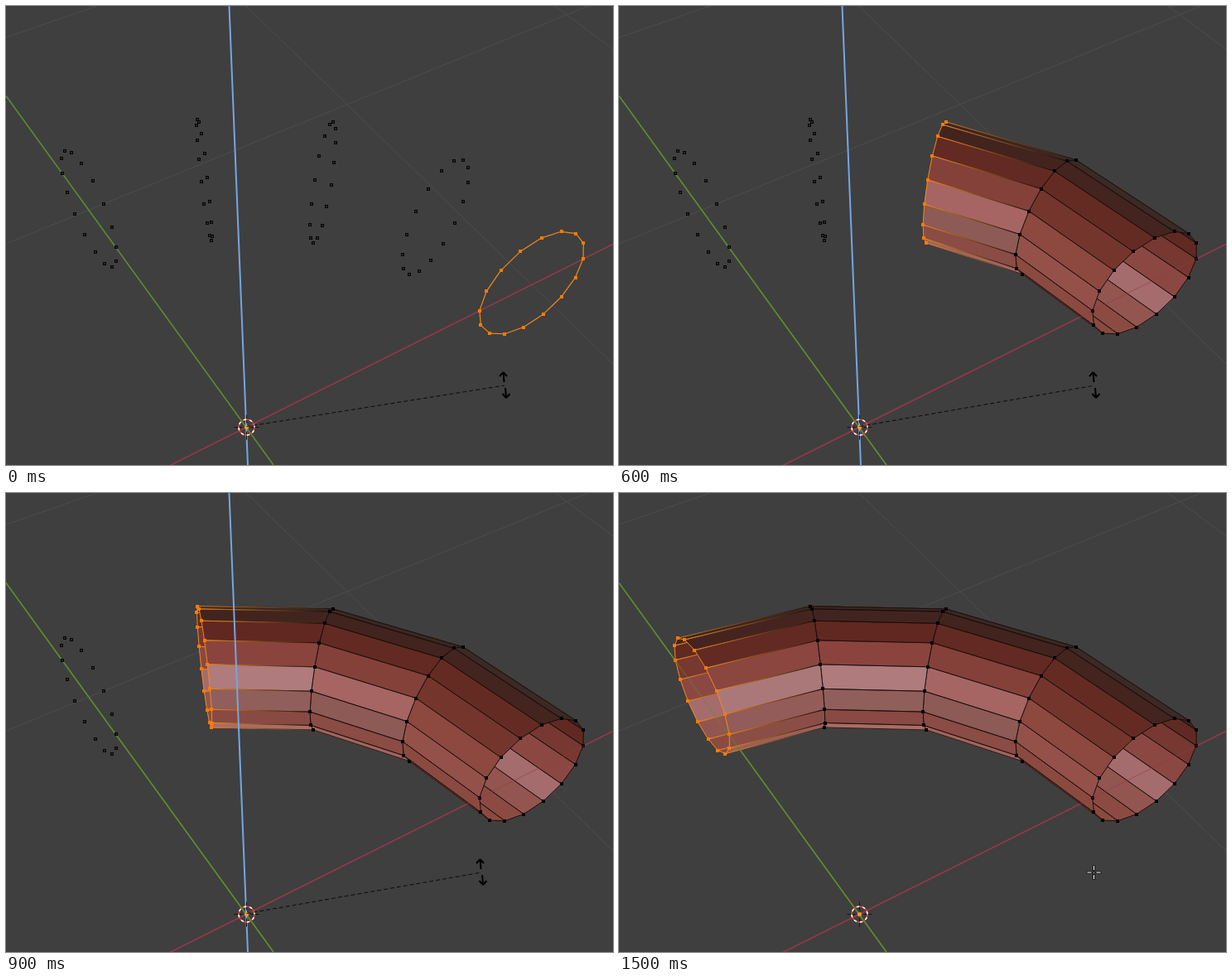
Animation, 733 px wide and 554 px high, one loop 1800 ms. Source, as an HTML page with a canvas:

```html
<!DOCTYPE html>
<html lang="en">
<head>
<meta charset="utf-8">
<title>Spin extrusion</title>
<style>
  html, body { margin: 0; width: 100%; height: 100%; overflow: hidden; background: #3f3f3f; }
  canvas { display: block; }
</style>
</head>
<body>
<canvas id="stage" width="733" height="554"></canvas>
<script>
const ctx = document.getElementById('stage').getContext('2d');
const STEP = 300, STATES = 6, SIDES = 16, RINGS = 5, TUBE = 0.2;
const ORIGIN = [290, 508];
const ORANGE = '#f08a1c', DOT = '#ff7a00', EDGE = '#170d0b';

// Outer wall, one row per segment, from the top down to the bottom
const OUTER = [
  ['#3b2926', '#43241f', '#642b22', '#74362c', '#8d483f', '#94514a', '#8a4a40', '#83443b'],
  ['#3b2724', '#42231e', '#622a22', '#84413a', '#a66562', '#8d5a55', '#8a4c44', '#a0655d'],
  ['#3a2623', '#42241f', '#602821', '#8a443d', '#af7b7d', '#905f5b', '#884a43', '#a96d65'],
  ['#3c2623', '#45241f', '#622a22', '#8b463f', '#ab787a', '#935c58', '#8a4e47', '#9a6158']
];
// Inner wall, from the bottom back up to the top
const INNER = ['#8a4a40', '#8b4b43', '#935550', '#a56c6d', '#8b4842', '#763831', '#602a23', '#44241f'];

// World to screen: perspective with the spin radius as unit
function project(x, y, z) {
  const d = 1 + 0.103 * x + 0.174 * y - 0.2025 * z;
  return [
    (ORIGIN[0] + 410.5 * x - 173.5 * y - 68.5 * z) / d + 0.5,
    (ORIGIN[1] - 138.3 * x - 220.7 * y - 364.5 * z) / d + 0.5
  ];
}

const rings = Array.from({ length: RINGS }, (_, k) => {
  const turn = k * Math.PI / 8;
  return Array.from({ length: SIDES }, (_, i) => {
    const a = (i - 2) * Math.PI / 8, rho = 1 - TUBE * Math.sin(a);
    return project(rho * Math.cos(turn), rho * Math.sin(turn), TUBE * Math.cos(a));
  });
});

function line(a, b, color, width = 1) {
  ctx.strokeStyle = color;
  ctx.lineWidth = width;
  ctx.beginPath();
  ctx.moveTo(...a);
  ctx.lineTo(...b);
  ctx.stroke();
}

function square([x, y], color, size = 4) {
  ctx.fillStyle = color;
  ctx.fillRect(Math.round(x - size / 2), Math.round(y - size / 2), size, size);
}

function fade(a, b) {
  const g = ctx.createLinearGradient(...a, ...b);
  g.addColorStop(0, EDGE);
  g.addColorStop(1, ORANGE);
  return g;
}

function grid() {
  const color = '#4c4c4c';
  line([0, 38], [110, 0], color);
  line([0, 287], [703, 0], color);
  line([290, 0], [733, 432], color);
  line([663, 0], [733, 52], color);
}

function groundAxes() {
  line([0, 108.5], [323, 554], '#618a2e', 1.6);
  line([198, 554.5], [733, 287.5], '#963849', 1.5);
}

// One pass draws either the walls facing away or those facing the viewer
function walls(last, front) {
  const dots = [];
  for (let k = 0; k < last; k++) {
    const A = rings[k], B = rings[k + 1], open = k + 1 === last;
    const faces = [];
    for (let i = 0; i < SIDES; i++) {
      const j = (i + 1) % SIDES;
      const facing = (A[j][0] - A[i][0]) * (B[i][1] - A[i][1])
                   - (A[j][1] - A[i][1]) * (B[i][0] - A[i][0]) > 0;
      if (facing === front) faces.push([i, j]);
    }
    for (const [i, j] of faces) {
      ctx.fillStyle = ctx.strokeStyle = i < 8 ? OUTER[k][i] : INNER[i - 8];
      ctx.lineWidth = 0.6;
      ctx.beginPath();
      for (const p of [A[i], A[j], B[j], B[i]]) ctx.lineTo(...p);
      ctx.closePath();
      ctx.fill();
      ctx.stroke();
    }
    for (const [i, j] of faces) {
      line(A[i], A[j], EDGE);
      for (const s of [i, j]) {
        line(A[s], B[s], open ? fade(A[s], B[s]) : EDGE, 0.8);
        dots.push([A[s], '#000'], [B[s], open ? DOT : '#000']);
      }
    }
    for (const [i, j] of faces) line(B[i], B[j], open ? ORANGE : EDGE);
  }
  for (const [p, color] of dots) square(p, color);
}

function pivot() {
  const [x, y] = [ORIGIN[0] + 0.5, ORIGIN[1] + 0.5];
  for (const [dx, dy] of [[1, 0], [-1, 0], [0, 1], [0, -1]])
    line([x + dx * 5, y + dy * 5], [x + dx * 15, y + dy * 15], '#151515');
  ctx.lineWidth = 1.6;
  for (let i = 0; i < 16; i++) {
    ctx.strokeStyle = i % 2 ? '#fff' : '#e0432f';
    ctx.beginPath();
    ctx.arc(x, y, 9.5, i * Math.PI / 8, (i + 1) * Math.PI / 8);
    ctx.stroke();
  }
  ctx.fillStyle = '#ff9a2e';
  ctx.beginPath();
  ctx.arc(x, y, 2.5, 0, 7);
  ctx.fill();
}

function arrow(x, tip, dir) {
  const head = tip + dir * 5;
  line([x, tip], [x + dir, tip + dir * 12], '#000', 2);
  line([x, tip], [x - 4.5, head], '#000', 2);
  line([x, tip], [x + 4.5, head], '#000', 2);
}

function dragTool(x) {
  ctx.setLineDash([5, 3]);
  line([290.5, 507.5], [x, 458], '#0a0a0a');
  ctx.setLineDash([]);
  arrow(x - 1.5, 442, 1);
  arrow(x + 2, 473, -1);
}

function pointer(x, y) {
  for (const [color, width, pad] of [['#1c1c1c', 3, 1], ['#fff', 1, 0]]) {
    for (const [dx, dy] of [[1, 0], [-1, 0], [0, 1], [0, -1]])
      line([x + dx * (3 - pad), y + dy * (3 - pad)], [x + dx * (8 + pad), y + dy * (8 + pad)], color, width);
    square([x, y], color, width);
  }
}

function draw(state) {
  const last = Math.min(state, RINGS - 1), dragging = state < STATES - 1;
  ctx.fillStyle = '#3f3f3f';
  ctx.fillRect(0, 0, 733, 554);
  grid();
  groundAxes();
  walls(last, false);
  walls(last, true);
  if (last) {
    // The ground axes show faintly over the mesh
    ctx.globalAlpha = 0.4;
    groundAxes();
    ctx.globalAlpha = 1;
  } else {
    rings[0].forEach((p, i) => line(p, rings[0][(i + 1) % SIDES], ORANGE, 1.2));
    rings[0].forEach(p => square(p, DOT));
  }
  if (dragging) line([269.5, 0], [292, 554], '#74a6e4', 2);
  for (const ring of rings.slice(last + 1))
    for (const p of ring) {
      square(p, '#050505');
      square(p, '#2a2a2a', 2);
    }
  pivot();
  if (dragging) dragTool(state < 2 ? 602 : 574);
  else pointer(573.5, 458);
}

function tick() {
  draw(Math.floor(performance.now() / STEP) % STATES);
  requestAnimationFrame(tick);
}
tick();
</script>
</body>
</html>
```
